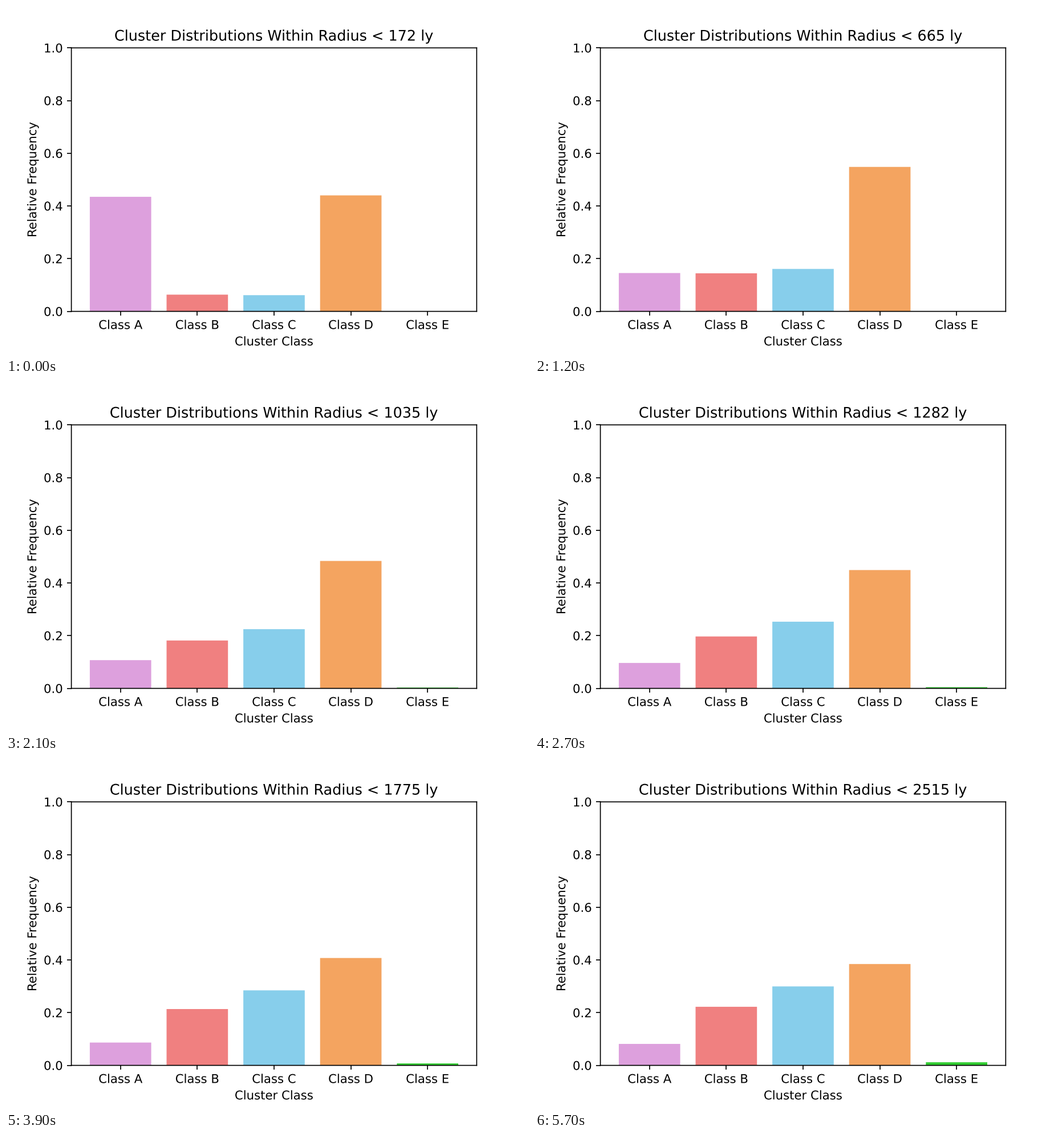
A matplotlib script that plays this animation: 917 px wide and 611 px high, repeating every 6000 ms.

```python
import numpy as np
import matplotlib.pyplot as plt
from matplotlib.animation import FuncAnimation
from matplotlib.patheffects import Normal

W, H = 917, 611
DPI = W / 6
FRAMES, INTERVAL = 20, 300
R_MIN, R_MAX = 172, 2515

CLASSES = ["Class A", "Class B", "Class C", "Class D", "Class E"]
COLORS = ["plum", "lightcoral", "skyblue", "sandybrown", "limegreen"]

# Path effects draw text as outlines, so nothing is rounded to whole pixels
plt.rcParams.update({
    "font.family": "DejaVu Sans",
    "font.size": 10,
    "text.hinting": "none",
    "path.snap": False,
    "path.effects": [Normal()],
})


def saturate(i, start, limit, tau, power):
    """Growth that levels off at limit."""
    return limit + (start - limit) * np.exp(-(i / tau) ** power)


def heights(i):
    a = 0.0777 + 0.3571 * (1 + i / 5.5) ** -3.04
    b = saturate(i, 0.0635, 0.225, 5.5, 1.14)
    c = saturate(i, 0.0615, 0.303, 6.41, 1.34)
    e = 0.00074 * max(0, i - 3)
    return [a, b, c, 1 - a - b - c - e, e]


def title(i):
    radius = round(R_MIN + (R_MAX - R_MIN) * i / (FRAMES - 1))
    return f"Cluster Distributions Within Radius < {radius} ly"


# The tiny addition keeps float rounding from dropping a pixel
fig, ax = plt.subplots(figsize=((W + 1e-6) / DPI, (H + 1e-6) / DPI), dpi=DPI)
fig.subplots_adjust(left=0.125, right=0.9, bottom=0.125, top=0.88)

bars = ax.bar(CLASSES, heights(0), color=COLORS)
ax.set_xlim(-0.64, 4.64)
ax.set_ylim(0, 1)
ax.set_xlabel("Cluster Class")
ax.set_ylabel("Relative Frequency")
heading = ax.set_title(title(0))


def draw(i):
    for bar, h in zip(bars, heights(i)):
        bar.set_height(h)
    heading.set_text(title(i))
    return [*bars, heading]


anim = FuncAnimation(fig, draw, frames=FRAMES, init_func=lambda: draw(0),
                     interval=INTERVAL, repeat=True, repeat_delay=0)
plt.show()
```
